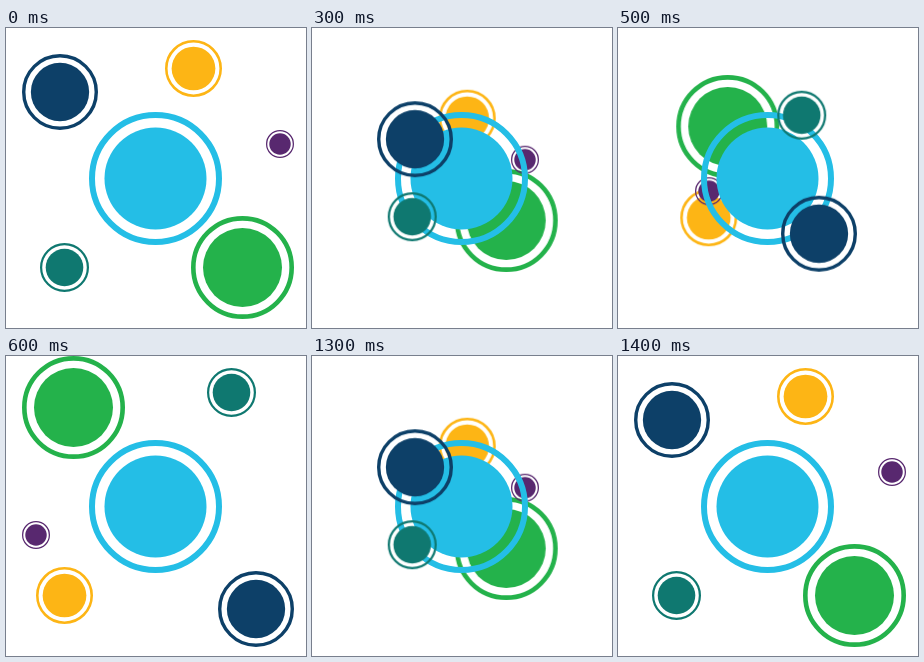
Recreate the animation shown at these times as an HTML page. Size 300 px wide and 300 px high, loop 1.7 s.

```html
<!DOCTYPE html>
<html lang="en">
<head>
<meta charset="utf-8">
<title>Circles trading places</title>
<style>
  html, body { margin: 0; width: 100%; height: 100%; overflow: hidden; background: #fff; }
  svg { display: block; width: 100vw; height: 100vh; }
  .dot { color: var(--c); animation: swap 1.7s step-end infinite; }
  .disc { fill: currentColor; }
  .ring { fill: none; stroke: currentColor; stroke-width: .09; }

  /* Each dot crosses the centre in quarter steps, rests, then returns. */
  @keyframes swap {
    0%      { transform: none; }
    17.647% { transform: translate(calc(var(--dx) * .25), calc(var(--dy) * .25)); }
    23.529% { transform: translate(calc(var(--dx) * .5), calc(var(--dy) * .5)); }
    29.411% { transform: translate(calc(var(--dx) * .75), calc(var(--dy) * .75)); }
    35.294% { transform: translate(var(--dx), var(--dy)); }
    64.705% { transform: translate(calc(var(--dx) * .75), calc(var(--dy) * .75)); }
    70.588% { transform: translate(calc(var(--dx) * .5), calc(var(--dy) * .5)); }
    76.47%  { transform: translate(calc(var(--dx) * .25), calc(var(--dy) * .25)); }
    82.352%, 100% { transform: none; }
  }
</style>
</head>
<body>
<svg viewBox="0 0 300 300">
  <defs>
    <g id="target">
      <circle class="ring" r=".955"/>
      <circle class="disc" r=".767"/>
    </g>
  </defs>
  <g class="dot" style="--c:#24b24b; --dx:-169px; --dy:-188px">
    <use href="#target" transform="translate(236.5 239.5) scale(51.5)"/>
  </g>
  <g class="dot" style="--c:#fdb515; --dx:-129px; --dy:199px">
    <use href="#target" transform="translate(187.5 40.5) scale(28.5)"/>
  </g>
  <g class="dot" style="--c:#58286f; --dx:-244px; --dy:63px">
    <use href="#target" transform="translate(274 116) scale(14)"/>
  </g>
  <g color="#24bee6">
    <use href="#target" transform="translate(149.5 150.5) scale(66.5)"/>
  </g>
  <g class="dot" style="--c:#0f7870; --dx:167px; --dy:-203px">
    <use href="#target" transform="translate(58.5 239.5) scale(24.5)"/>
  </g>
  <g class="dot" style="--c:#0d4068; --dx:196px; --dy:189px">
    <use href="#target" transform="translate(54 64) scale(38)"/>
  </g>
</svg>
</body>
</html>
```
